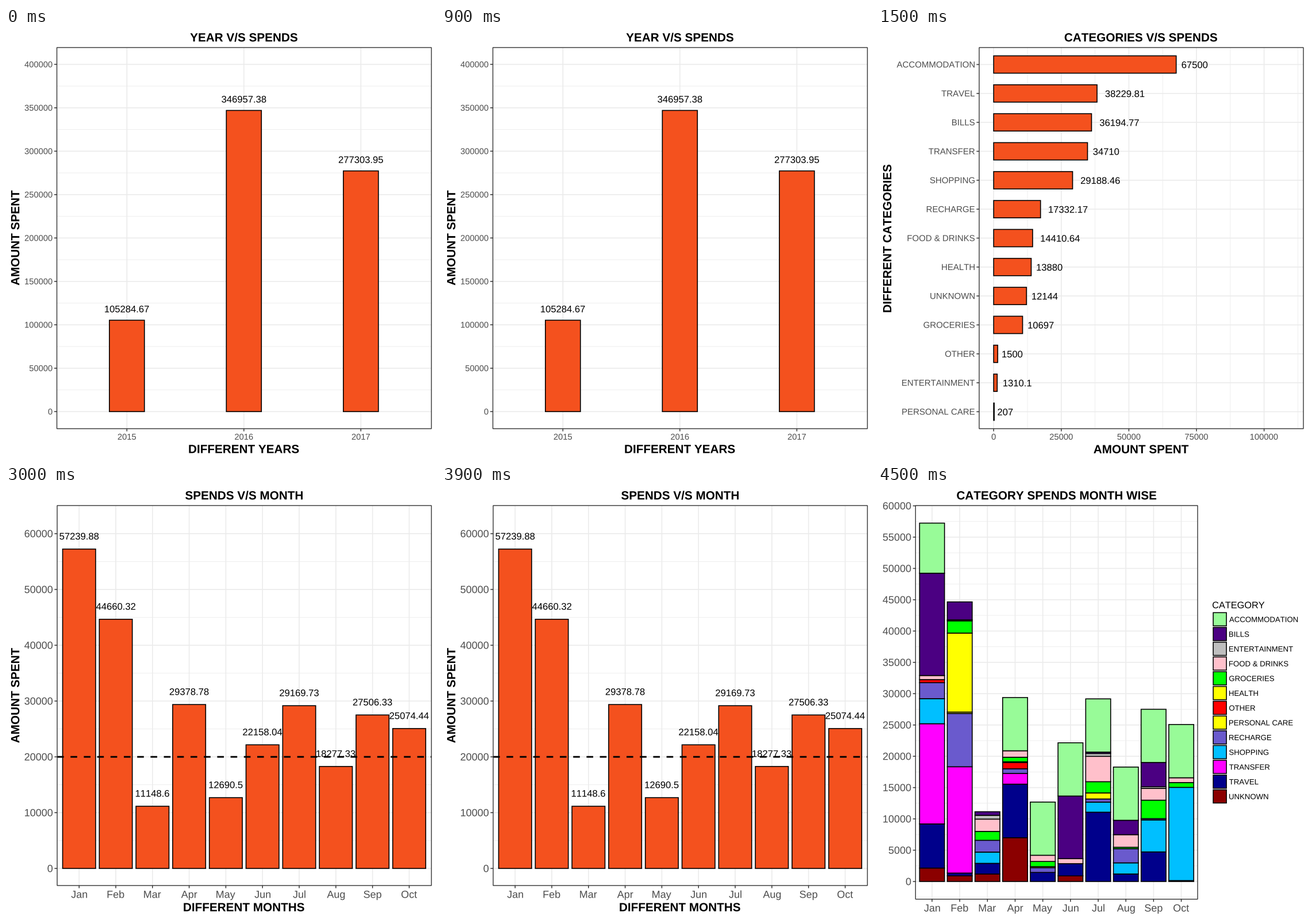
Animation of 748 by 748 pixels, one loop 6000 ms. Source, as a matplotlib script:

```python
import matplotlib.pyplot as plt
from matplotlib.animation import FuncAnimation
from matplotlib.lines import Line2D
from matplotlib.patches import PathPatch, Rectangle
from matplotlib.textpath import TextPath
from matplotlib.transforms import Affine2D

SIZE, DPI = 748, 72
ORANGE, GRID, DARK, GREY = "#F4511E", "#EBEBEB", "#333333", "#4D4D4D"
TOP, RIGHT = 34, 740
LABEL_SIZE = 16.6
MONTHS = "Jan Feb Mar Apr May Jun Jul Aug Sep Oct".split()

YEARS = {"2015": 105284.67, "2016": 346957.38, "2017": 277303.95}
CATEGORIES = {
    "ACCOMMODATION": 67500, "TRAVEL": 38229.81, "BILLS": 36194.77,
    "TRANSFER": 34710, "SHOPPING": 29188.46, "RECHARGE": 17332.17,
    "FOOD & DRINKS": 14410.64, "HEALTH": 13880, "UNKNOWN": 12144,
    "GROCERIES": 10697, "OTHER": 1500, "ENTERTAINMENT": 1310.1,
    "PERSONAL CARE": 207,
}
MONTHLY = [57239.88, 44660.32, 11148.6, 29378.78, 12690.5,
           22158.04, 29169.73, 18277.33, 27506.33, 25074.44]

# Legend key: (label, colour)
LEGEND = {
    "A": ("ACCOMMODATION", "#98FB98"), "B": ("BILLS", "#4B0082"),
    "E": ("ENTERTAINMENT", "#BEBEBE"), "F": ("FOOD & DRINKS", "#FFC0CB"),
    "G": ("GROCERIES", "#00FF00"), "H": ("HEALTH", "#FFFF00"),
    "O": ("OTHER", "#FF0000"), "P": ("PERSONAL CARE", "#FFFF00"),
    "R": ("RECHARGE", "#6A5ACD"), "S": ("SHOPPING", "#00BFFF"),
    "T": ("TRANSFER", "#FF00FF"), "V": ("TRAVEL", "#00008B"),
    "U": ("UNKNOWN", "#8B0000"),
}
# Cumulative top of each segment, from the bottom up
STACKS = [
    dict(U=2150, V=9200, T=25200, S=29200, R=31750, O=32250, F=32900, B=49240, A=57240),
    dict(U=900, V=1350, T=18330, R=26850, P=27057, H=39680, G=41630, F=41800, B=44660),
    dict(U=1200, V=2900, S=4700, R=6580, G=8000, F=9970, E=10570, B=11149),
    dict(U=7000, V=15550, T=17260, R=18000, O=19000, H=19120, G=19850, F=20880, A=29379),
    dict(V=1450, R=2200, H=2370, G=3200, F=4190, A=12690),
    dict(U=900, V=2850, F=3650, B=13650, A=22158),
    dict(V=11070, S=12680, R=13180, H=14150, G=15940, F=19990, E=20440, B=20670, A=29170),
    dict(V=1200, S=2980, R=5230, G=5470, F=7480, B=9780, A=18277),
    dict(V=4730, S=9830, R=10050, G=12990, F=14880, E=15130, B=19010, A=27506),
    dict(V=150, S=15030, G=15800, F=16570, A=25074),
]

plt.rcParams.update({"path.snap": False, "text.kerning_factor": 6})
fig = plt.figure(figsize=(SIZE / DPI, SIZE / DPI), dpi=DPI, facecolor="white")
ax = fig.add_axes([0, 0, 1, 1])


def text(x, y, string, size, align=0.5, color="black", weight="normal", turn=0):
    """Place text with its capitals centred on y; align 0, .5, 1 = left, centre, right."""
    path = TextPath((0, 0), string, size=size,
                    prop={"family": "Liberation Sans", "weight": weight})
    box = path.get_extents()
    move = (Affine2D().translate(-box.x0 - align * box.width, -0.345 * size)
            .scale(1, -1).rotate_deg(-turn).translate(x, y))
    ax.add_patch(PathPatch(move.transform_path(path), fc=color, lw=0, zorder=4))


def heading(x, y, string, turn=0):
    text(x, y, string, 20.7, weight="bold", turn=turn)


def line(x0, y0, x1, y1, color, width, zorder=0, **style):
    ax.add_line(Line2D([x0, x1], [y0, y1], color=color, lw=width, zorder=zorder,
                       solid_capstyle="butt", dash_capstyle="butt", **style))


def box(x0, y0, x1, y1, fill, edge="black", width=1.6, zorder=2):
    ax.add_patch(Rectangle((x0, y0), x1 - x0, y1 - y0, fc=fill, ec=edge,
                           lw=width, zorder=zorder))


def panel(left, bottom, right=RIGHT):
    box(left, TOP, right, bottom, "none", DARK, 1.4, zorder=5)


def x_axis(ticks, bottom, label_y, size):
    for x, label in ticks:
        line(x, TOP, x, bottom, GRID, 1.6)
        line(x, bottom, x, bottom + 4.6, DARK, 1.5)
        text(x, label_y, label, size, color=GREY)


def y_axis(ticks, left, size, right=RIGHT):
    for y, label in ticks:
        line(left, y, right, y, GRID, 1.6)
        line(left - 4.6, y, left, y, DARK, 1.5)
        text(left - 8, y, label, size, 1, GREY)


def value_axis(zero, pitch, step, count, left, size, right=RIGHT):
    for i in range(count - 1):
        y = zero - (i + 0.5) * pitch
        line(left, y, right, y, GRID, 0.8)
    y_axis([(zero - i * pitch, str(i * step)) for i in range(count)], left, size, right)


def columns(values, centers, half, zero, scale, lift):
    for x, value in zip(centers, values):
        top = zero - value * scale
        box(x - half, top, x + half, zero, ORANGE)
        text(x, top - lift, str(value), LABEL_SIZE)


def years_chart():
    left, bottom, zero, pitch = 88.5, 697, 667.3, 75.5
    centers = [210.3 + 203.5 * i for i in range(3)]
    value_axis(zero, pitch, 50000, 9, left, 14.7)
    x_axis(zip(centers, YEARS), bottom, 711, 14.7)
    columns(YEARS.values(), centers, 30.5, zero, pitch / 50000, 19.5)
    panel(left, bottom)
    heading(413.7, 16.3, "YEAR V/S SPENDS")
    heading(413.9, 732.3, "DIFFERENT YEARS")
    heading(16, 365, "AMOUNT SPENT", 90)


def categories_chart():
    left, bottom, zero, pitch = 176, 697, 201.2, 117.6
    rows = [63.5 + 50.33 * i for i in range(len(CATEGORIES))]
    for i in range(5):
        x = zero + (i + 0.5) * pitch
        line(x, TOP, x, bottom, GRID, 0.8)
    x_axis([(zero + i * pitch, str(25000 * i)) for i in range(5)], bottom, 711, 14.8)
    y_axis(zip(rows, CATEGORIES), left, 15)
    for y, value in zip(rows, CATEGORIES.values()):
        end = zero + value * pitch / 25000
        label = str(value)
        width = LABEL_SIZE * (0.556 * len(label) - 0.278 * label.count("."))
        box(zero, y - 15.1, end, y + 15.1, ORANGE)
        text(end + 0.2 * width + 0.6, y + 0.5, label, LABEL_SIZE, 0)
    panel(left, bottom)
    heading(457.3, 16.3, "CATEGORIES V/S SPENDS")
    heading(457.7, 732.6, "AMOUNT SPENT")
    heading(16, 366, "DIFFERENT CATEGORIES", 90)


def months_chart():
    left, bottom, zero, pitch = 89, 695, 665.3, 97.07
    centers = [127.2 + 63.8 * i for i in range(10)]
    value_axis(zero, pitch, 10000, 7, left, 18)
    x_axis(zip(centers, MONTHS), bottom, 710.3, 18)
    columns(MONTHLY, centers, 28.7, zero, pitch / 10000, 22.3)
    limit = zero - 2 * pitch
    line(left, limit, RIGHT, limit, "black", 2.9, zorder=3, dashes=(4, 4))
    panel(left, bottom)
    heading(414, 16.3, "SPENDS V/S MONTH")
    heading(414, 732.6, "DIFFERENT MONTHS")
    heading(16, 364.3, "AMOUNT SPENT", 90)


def stacked_chart():
    left, right, bottom, zero, pitch = 65.3, 556, 718.7, 688, 54.46
    centers = [94 + 48.17 * i for i in range(10)]
    line(left, zero + pitch / 2, right, zero + pitch / 2, GRID, 0.8)
    value_axis(zero, pitch, 5000, 13, left, 18, right)
    x_axis(zip(centers, MONTHS), bottom, 734, 18)
    for x, stack in zip(centers, STACKS):
        base = zero
        for key, total in stack.items():
            top = zero - total * pitch / 5000
            box(x - 21.7, top, x + 21.7, base, LEGEND[key][1])
            base = top
    panel(left, bottom, right)
    heading(310.7, 16.3, "CATEGORY SPENDS MONTH WISE")
    text(582, 207, "CATEGORY", 16.3, 0)
    for i, (label, color) in enumerate(LEGEND.values()):
        y = 231.8 + 25.68 * i
        box(583.1, y - 11.5, 606.1, y + 11.5, color)
        text(611, y + 0.3, label, 13.2, 0)


CHARTS = [years_chart, categories_chart, months_chart, stacked_chart]


def draw(index):
    ax.clear()
    ax.set_axis_off()
    ax.set_xlim(0, SIZE)
    ax.set_ylim(SIZE, 0)
    CHARTS[index]()
    return []


animation = FuncAnimation(fig, draw, frames=len(CHARTS), interval=1500, repeat=True)
plt.show()
```
